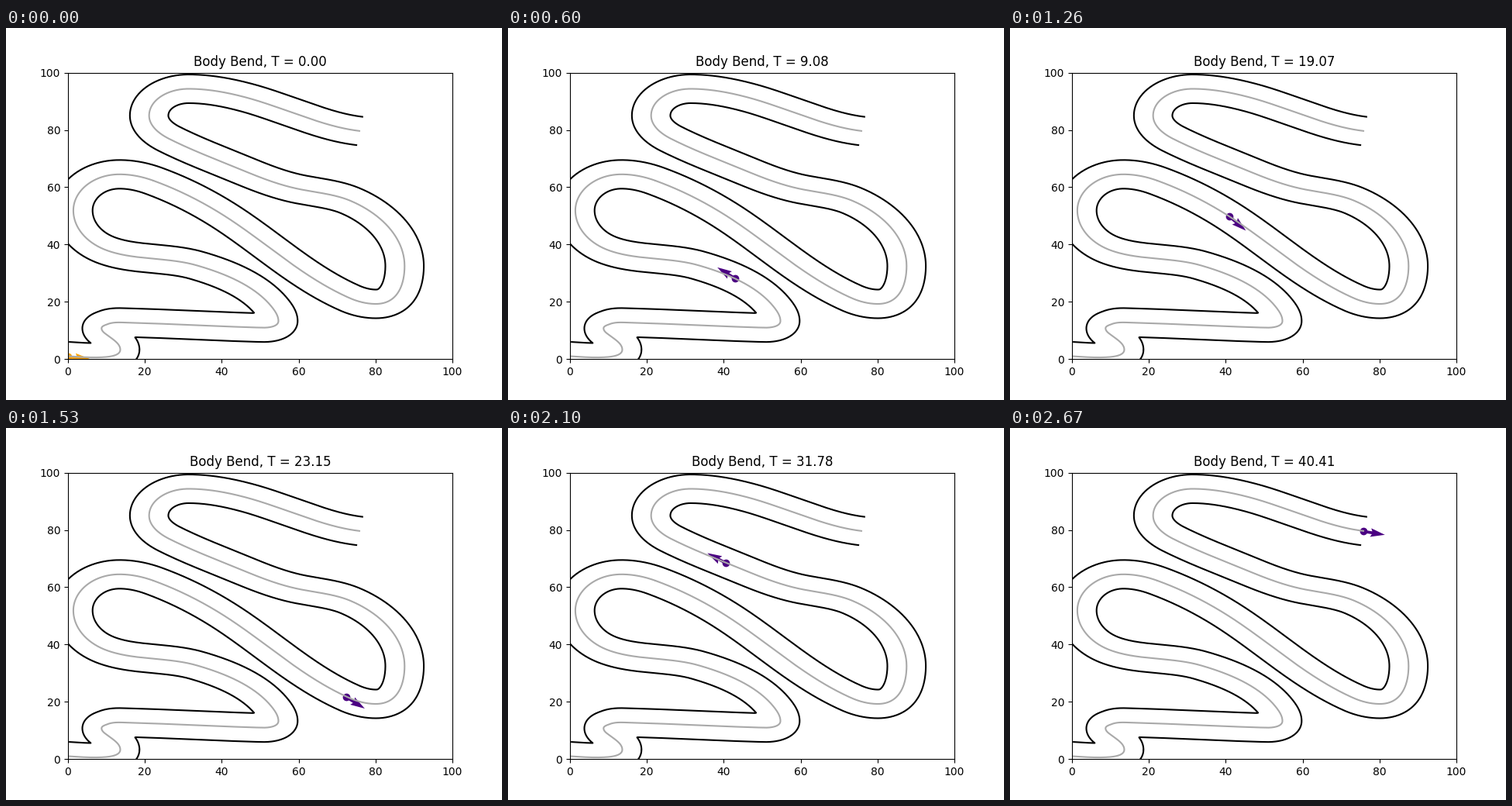
Animation of 640 by 480 pixels, one loop 2700 ms. Source, as a matplotlib script:

```python
import numpy as np
import matplotlib.pyplot as plt
from matplotlib.animation import FuncAnimation

FRAMES, INTERVAL = 90, 30
DT = 0.454
END_TIME = (FRAMES - 1) * DT
RAMP = 0.2          # time constant of the start from rest
HALF_WIDTH = 5

# Bends of the lane: x, y and heading in degrees
BENDS = [
    (0, 1, -5), (9, 0.65, 4), (13.6, 3.3, 90), (10.6, 8, 135),
    (8.73, 10.75, 90), (10.3, 12.2, 28), (15.5, 12.72, -2),
    (50.5, 10.97, -2), (54.74, 13.3, 90), (53.2, 17.9, 120),
    (33.4, 32.75, 159), (10.1, 37.95, 154), (1.39, 51.9, 90),
    (13.4, 64.5, 0), (22.2, 62.3, -26), (41.4, 49.4, -41),
    (73.1, 21.4, -31), (80.1, 19.26, 0), (87.56, 32.5, 90),
    (73.6, 55.2, 150), (60.3, 59.3, 165), (46, 65.6, 151),
    (26.3, 76.9, 146), (21.1, 85, 90), (31.35, 94.35, 0),
    (46.7, 91.2, -20), (57, 86.7, -25), (75.8, 79.65, -9),
]


def bend(a, b, s):
    """Hermite arc between two bends; gives points and unit tangents."""
    p, q = complex(*a[:2]), complex(*b[:2])
    turn = np.radians(b[2] - a[2])
    reach = abs(q - p) / np.cos(turn / 4) ** 2     # exact for a circular arc
    m = reach * np.exp(1j * np.radians(a[2]))
    n = reach * np.exp(1j * np.radians(b[2]))
    c2 = 3 * (q - p) - 2 * m - n
    c3 = m + n - 2 * (q - p)
    tangent = m + s * (2 * c2 + 3 * s * c3)
    return p + s * (m + s * (c2 + s * c3)), tangent / np.abs(tangent)


def wall(side):
    """Parallel curve with the parts too close to the centre cut away."""
    edge = centre + side * HALF_WIDTH * 1j * tangent
    gap = np.abs(edge[:, None] - centre[None, :]).min(axis=1)
    return edge[gap > HALF_WIDTH - 0.02]


steps = np.linspace(0, 1, 70)
arcs = [bend(a, b, steps) for a, b in zip(BENDS, BENDS[1:])]
centre, tangent = (np.concatenate(part) for part in zip(*arcs))
length = np.concatenate([[0], np.cumsum(np.abs(np.diff(centre)))])
heading = np.unwrap(np.angle(tangent))


def travelled(t):
    """Distance along the lane: a short run-up, then constant speed."""
    def run(u):
        return u - RAMP * (1 - np.exp(-u / RAMP))
    return length[-1] * run(t) / run(END_TIME)


fig, ax = plt.subplots(figsize=(6.4, 4.8), dpi=100)
ax.plot(centre.real, centre.imag, color="darkgray")
for side in (1, -1):
    edge = wall(side)
    ax.plot(edge.real, edge.imag, color="black")
ax.set_xlim(0, 100)
ax.set_ylim(0, 100)

dot = ax.scatter([0], [1], color="indigo")
arrow = ax.quiver([0], [1], [1], [0], color="indigo")
title = ax.set_title("")


def update(frame):
    t = frame * DT
    s = travelled(t)
    x, y, angle = (np.interp(s, length, v)
                   for v in (centre.real, centre.imag, heading))
    color = "indigo" if frame else "orange"
    for part in (dot, arrow):
        part.set_offsets([[x, y]])
        part.set_color(color)
    arrow.set_UVC([np.cos(angle)], [np.sin(angle)])
    title.set_text(f"Body Bend, T = {t:.2f}")
    return dot, arrow, title


anim = FuncAnimation(fig, update, frames=FRAMES, interval=INTERVAL,
                     repeat=True, repeat_delay=0, blit=False)
plt.show()
```
